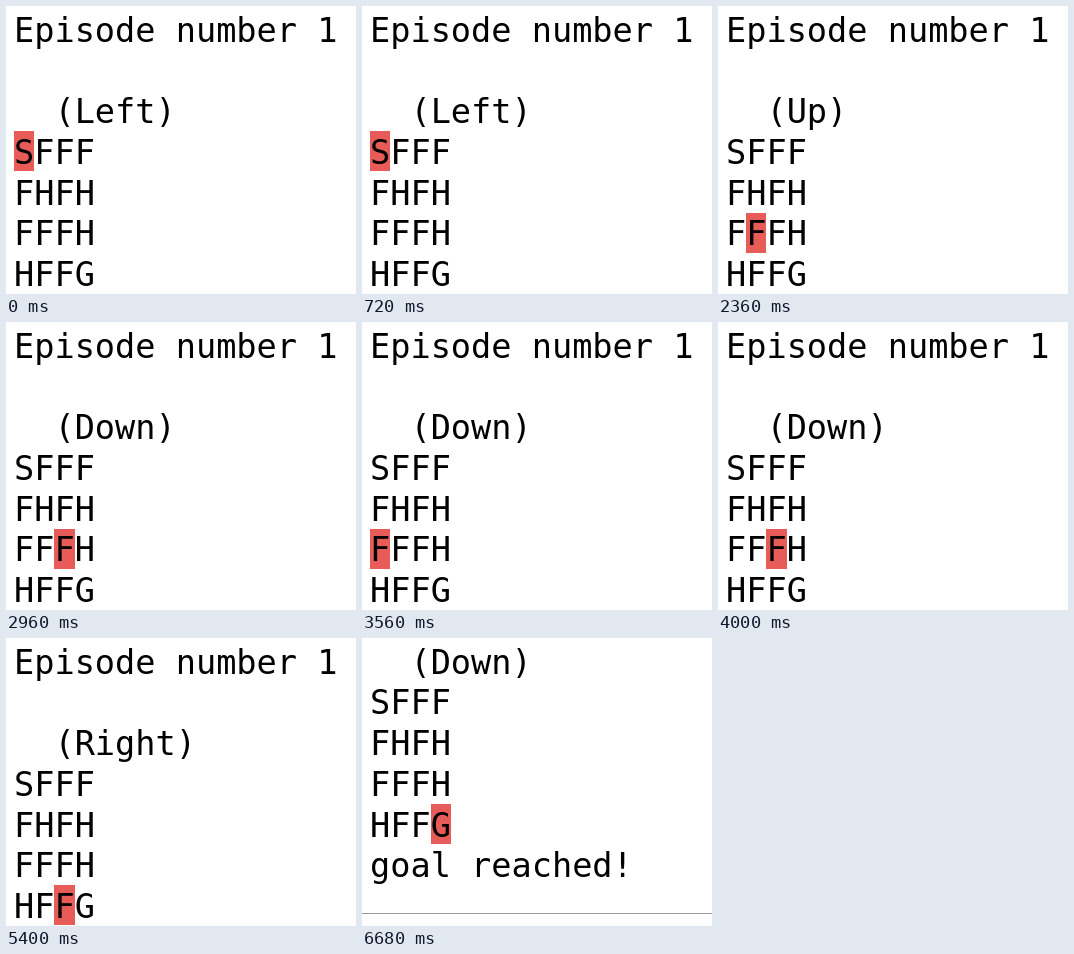
An HTML page with a canvas that plays this animation: 350x288 px, repeating every 8040 ms.

```html
<!DOCTYPE html>
<html lang="en">
<head>
<meta charset="utf-8">
<title>Frozen lake walk</title>
<style>
html, body { margin: 0; width: 100%; height: 100%; overflow: hidden; background: #fff; }
canvas { display: block; }
</style>
</head>
<body>
<canvas id="stage" width="350" height="288"></canvas>
<script>
const ctx = document.getElementById("stage").getContext("2d");

const LOOP = 8040, TICK = 40;
const FIRST_STEP = 236, STEP = 304.9;
const LEFT = 8, CELL = 20.23, LINE = 40.75, BASE = 35.6;

const grid = ["SFFF", "FHFH", "FFFH", "HFFG"];
const actions = { L: "Left", U: "Up", D: "Down", R: "Right" };

// Each step: last action, row, column
const walk = ("L00 L10 L00 L00 L00 L00 L10 L20 U21 D22 L21 " +
  "D20 U21 D22 L32 D32 D32 D31 R32 D32 D33").split(" ");

const stepTime = k => Math.round((FIRST_STEP + STEP * k) / TICK) * TICK;

function stepAt(t) {
  let i = 0;
  while (i < walk.length - 1 && t >= stepTime(i)) i++;
  return i;
}

function print(text, line) {
  ctx.fillStyle = "#000";
  ctx.fillText(text, LEFT, BASE + line * LINE);
}

function mark(line, col) {
  ctx.fillStyle = "#e75c58";
  const x = Math.round(LEFT + col * CELL);
  const y = Math.round(2.9 + line * LINE);
  ctx.fillRect(x, y, Math.round(LEFT + (col + 1) * CELL) - x, 40);
}

function draw(t) {
  const i = stepAt(t);
  const [action, row, col] = walk[i];
  const done = i === walk.length - 1;
  const top = done ? 0 : 2;

  ctx.fillStyle = "#fff";
  ctx.fillRect(0, 0, 350, 288);
  ctx.font = '33.6px "DejaVu Sans Mono", monospace';

  mark(top + 1 + Number(row), Number(col));
  if (!done) print("Episode number 1", 0);
  print("  (" + actions[action] + ")", top);
  grid.forEach((cells, r) => print(cells, top + 1 + r));

  if (done) {
    print("goal reached!", 5);
    ctx.fillStyle = "#999";
    ctx.fillRect(0, 275, 350, 1);
  }
}

function frame() {
  draw(performance.now() % LOOP);
  requestAnimationFrame(frame);
}
frame();
</script>
</body>
</html>
```
